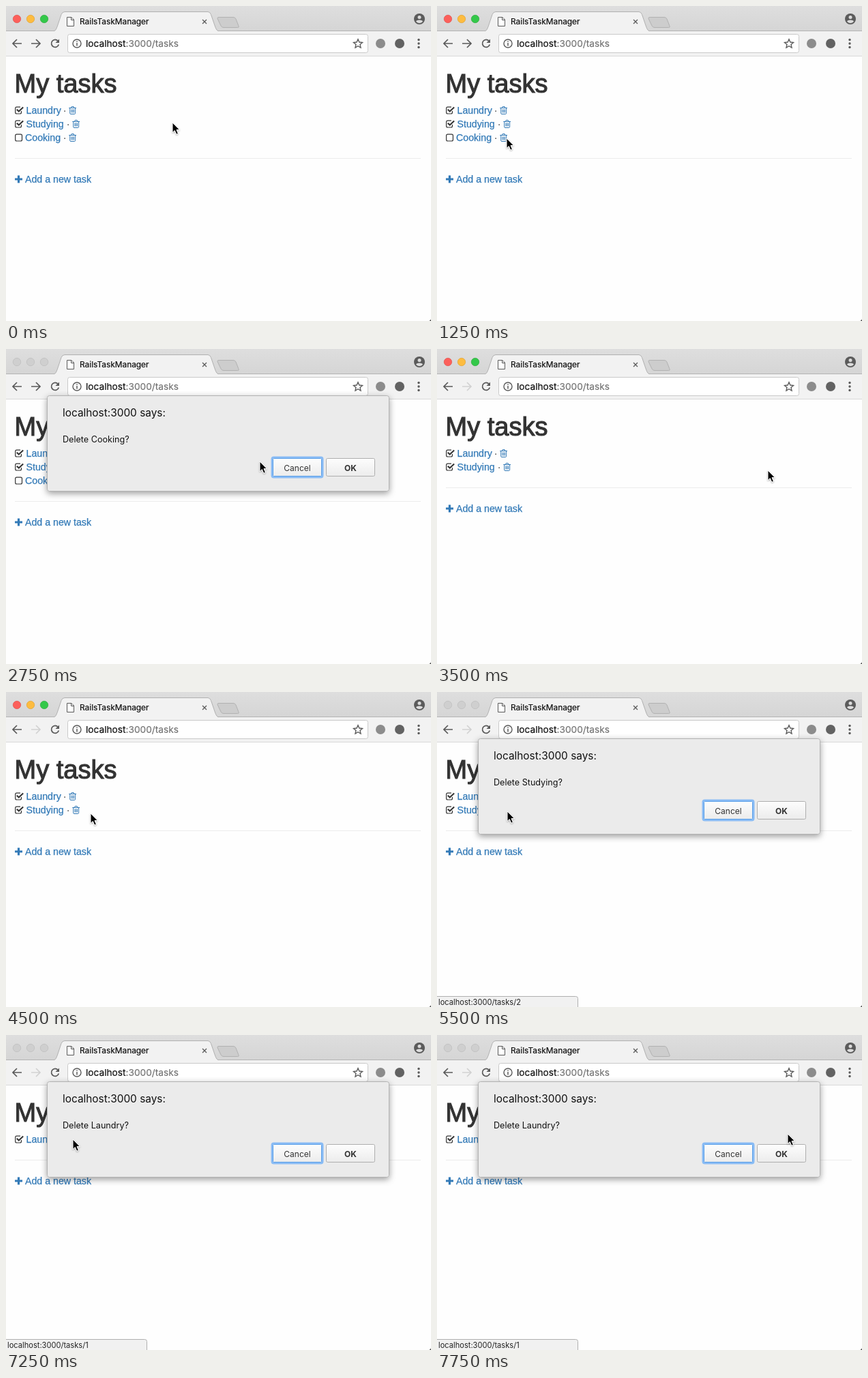
Animation, 623 px wide and 462 px high, one loop 8000 ms. Source, as an HTML page:

```html
<!DOCTYPE html>
<html lang="en">
<head>
<meta charset="utf-8">
<title>Task manager</title>
<style>
  html, body { margin: 0; width: 100%; height: 100%; overflow: hidden; background: #fefefe; }
  svg { display: block; width: 623px; height: 462px; }
  text { white-space: pre; }
  .ui { font-family: Inter, Roboto, sans-serif; }
  .page { font-family: "Liberation Sans", Arial, sans-serif; font-size: 14.2px; }
  .link { fill: #337ab7; stroke: #337ab7; stroke-width: .25; }
  .line { fill: none; stroke: #5a5a5a; stroke-width: 1.7; }
</style>
</head>
<body>
<svg viewBox="0 0 623 462">
  <defs>
    <linearGradient id="strip" x2="0" y2="1"><stop stop-color="#dedede"/><stop offset="1" stop-color="#d5d5d5"/></linearGradient>
    <linearGradient id="button" x2="0" y2="1"><stop stop-color="#fdfdfd"/><stop offset="1" stop-color="#ececec"/></linearGradient>
    <filter id="shadow" x="-10%" y="-20%" width="120%" height="150%">
      <feDropShadow dx="0" dy="3" stdDeviation="5" flood-color="#000" flood-opacity=".38"/>
    </filter>
    <filter id="soft" x="-50%" y="-30%" width="200%" height="180%">
      <feDropShadow dx="0" dy="1" stdDeviation="1" flood-color="#000" flood-opacity=".35"/>
    </filter>
  </defs>

  <rect width="623" height="462" fill="#fefefe"/>

  <g class="page">
    <text x="12.5" y="127" font-size="38" fill="#333" stroke="#333" stroke-width="1.1">My tasks</text>
    <g id="list"></g>
    <g id="footer">
      <path d="M13 163.5H608" stroke="#ececec"/>
      <path d="M13 194H24M18.5 188.5V199.5" stroke="#337ab7" stroke-width="3.2"/>
      <text class="link" x="28" y="199">Add a new task</text>
    </g>
  </g>

  <!-- browser window -->
  <rect width="623" height="37" fill="url(#strip)"/>
  <path d="M0 36.5H623" stroke="#b4b4b4"/>
  <path d="M312 16.5H333Q336 16.5 337 19L341 29.5Q342 31.5 339.5 31.5H319Q316 31.5 315 29L310 18.5Q309.5 16.5 312 16.5Z" fill="#cdcdcd" stroke="#b2b2b2"/>
  <path d="M69 37.5C73 36.5 74 33 75.5 29L81 12.5Q82.5 8.5 86 8.5H296Q299 8.5 300.5 12.5L306.5 30C308 34 309 36.5 313 37.5Z" fill="#f2f2f2" stroke="#b0b0b0"/>
  <rect y="37" width="623" height="36" fill="#f2f2f2"/>
  <path d="M0 73.5H623" stroke="#d9d9d9"/>
  <g id="lights"></g>

  <path d="M89.5 16.5H96L99.5 20V29.5H89.5ZM95.5 16.5V20.5H99.5" fill="#fff" stroke="#5a5a5a"/>
  <text class="ui" x="108" y="27.3" font-size="11.9" fill="#111" stroke="#111" stroke-width=".2">RailsTaskManager</text>
  <path d="M288 20L294 26M294 20L288 26" stroke="#5a5a5a" stroke-width="1.3"/>

  <circle cx="606" cy="19" r="8" fill="#5b5b5b"/>
  <circle cx="606" cy="16.4" r="2.5" fill="#dcdcdc"/>
  <path d="M601 22.8C602 19.7 610 19.7 611 22.8Q609 25.2 606 25.2T601 22.8Z" fill="#dcdcdc"/>

  <path class="line" d="M23 55H10M16 49L10 55L16 61"/>
  <path class="line" id="forward" d="M37 55H50M44 49L50 55L44 61"/>
  <path class="line" d="M76.2 51.3A5.5 5.5 0 1 0 77.3 56.5"/>
  <path d="M78 48.5V54H72.5Z" fill="#5a5a5a"/>

  <rect x="90.5" y="41.5" width="440" height="27" rx="3" fill="#fff" stroke="#c9c9c9"/>
  <circle class="line" cx="104" cy="55" r="6" style="stroke-width:1.4"/>
  <path d="M104 54V58.5M104 51.3V52.8" stroke="#5a5a5a" stroke-width="1.5"/>
  <text class="ui" x="117" y="60.2" font-size="13.7" fill="#111" stroke="#111" stroke-width=".2">localhost<tspan fill="#757575" stroke="#757575">:3000/tasks</tspan></text>
  <path class="line" style="stroke-width:1.4" d="M516 48.8L517.9 53L522.5 53.5L519 56.5L520 61L516 58.7L512 61L513 56.5L509.5 53.5L514.1 53Z"/>
  <circle cx="549" cy="55" r="7" fill="#8c8c8c"/>
  <circle cx="577" cy="55" r="7" fill="#626262"/>
  <g fill="#5a5a5a"><circle cx="605" cy="49.5" r="1.7"/><circle cx="605" cy="55" r="1.7"/><circle cx="605" cy="60.5" r="1.7"/></g>

  <g id="status" class="ui">
    <path d="M-1 446.5H203.5Q206.5 446.5 206.5 449.5V463H-1Z" fill="#f1f1f1" stroke="#b0b0b0"/>
    <text id="address" x="2" y="458.8" font-size="11.1" fill="#222"></text>
  </g>
  <path d="M623 459.5V462H620.5Z" fill="#555"/>

  <g id="dialog" class="ui" fill="#111">
    <rect id="panel" x="60.5" y="68.5" width="501" height="140" rx="3" fill="#ebebeb" stroke="#b3b3b3" filter="url(#shadow)"/>
    <text x="83" y="99" font-size="15.4">localhost:3000 says:</text>
    <text id="question" x="83" y="136.8" font-size="12.6"></text>
    <rect x="390" y="159" width="74" height="29" rx="2.5" fill="none" stroke="#8abcf5" stroke-width="3"/>
    <rect x="391.5" y="160.5" width="71" height="26" rx="1" fill="url(#button)" stroke="#5a9fe8"/>
    <rect id="ok" x="469.5" y="160.5" width="71" height="26" rx="2" fill="url(#button)" stroke="#aeaeae"/>
    <g font-size="12" text-anchor="middle" fill="#333">
      <text x="427" y="178.5">Cancel</text>
      <text x="505" y="178.5" font-weight="700">OK</text>
    </g>
  </g>

  <path id="cursor" d="M0 0V14.6L3.3 11.6L5.8 17.3L8.4 16.2L6 10.6H10.4Z" fill="#000" stroke="#fff" stroke-width="1" filter="url(#soft)"/>
</svg>

<script>
const LOOP = 8000;
const $ = id => document.getElementById(id);
const tasks = [
  { name: 'Laundry', done: true, trash: 92 },
  { name: 'Studying', done: true, trash: 97 },
  { name: 'Cooking', done: false, trash: 92 }
];

// [time, cursor x, cursor y, tasks left, mode]
// modes: '' idle, h hovering a bin, s status shown, d dialog, b dialog and status, c dialog closing
const steps = [
  [0, 244, 171, 3, ''],
  [750, 204, 180, 3, ''],
  [1000, 122, 194, 3, ''],
  [1250, 102, 194, 3, ''],
  [1500, 98, 191, 3, 'h'],
  [1750, 98, 191, 3, 's'],
  [2000, 98, 191, 3, 'b'],
  [2250, 99, 190, 3, 'b'],
  [2500, 205, 175, 3, 'd'],
  [2750, 372, 165, 3, 'd'],
  [3000, 496, 174, 3, 'd'],
  [3250, 502, 177, 3, 'c'],
  [3500, 485, 178, 2, ''],
  [3750, 290, 180, 2, ''],
  [4000, 136, 180, 2, ''],
  [4500, 124, 178, 2, ''],
  [4750, 103, 175, 2, 'h'],
  [5000, 103, 175, 2, 's'],
  [5250, 103, 175, 2, 'b'],
  [5750, 250, 178, 2, 'b'],
  [6000, 500, 180, 2, 'd'],
  [6250, 502, 180, 2, 'c'],
  [6500, 440, 176, 1, ''],
  [6750, 200, 161, 1, ''],
  [7000, 98, 153, 1, 's'],
  [7250, 98, 153, 1, 'b'],
  [7500, 300, 152, 1, 'b'],
  [7750, 514, 145, 1, 'b']
];

function taskRow({ name, done, trash }, row, active) {
  const box = done
    ? 'M22.5 154V156Q22.5 158 20.5 158H15.7Q13.7 158 13.7 156V150.2Q13.7 148.2 15.7 148.2H21'
    : 'M15.7 148.2H21.5Q23.5 148.2 23.5 150.2V156Q23.5 158 21.5 158H15.7Q13.7 158 13.7 156V150.2Q13.7 148.2 15.7 148.2Z';
  const tick = done ? '<path d="M15.8 151.8L18.8 154.6L25.2 148.6" fill="none" stroke="#333" stroke-width="2"/>' : '';
  return `<g transform="translate(0 ${row * 20})">
    <path d="${box}" fill="none" stroke="#333" stroke-width="1.2"/>${tick}
    <text class="link" x="${done ? 29.5 : 28}" y="158">${name}</text>
    <text x="${trash - 6}" y="158" text-anchor="middle" fill="#333">·</text>
    <path transform="translate(${trash})" fill="none" stroke="${active ? '#23527c' : '#337ab7'}"
      d="M.3 149.5H11M3.5 149.5L4.2 147.5H7.2L7.8 149.5M1.7 149.5V157.3Q1.7 158.5 3 158.5H8.3Q9.6 158.5 9.6 157.3V149.5M3.9 151.5V156.5M5.7 151.5V156.5M7.5 151.5V156.5"/>
  </g>`;
}

function drawLights(focused) {
  const fills = focused ? ['#fc605b', '#fdbc40', '#34c84a'] : Array(3).fill('#cfcfcf');
  const edges = focused ? ['#e2504b', '#e0a333', '#2bac3c'] : Array(3).fill('#bcbcbc');
  $('lights').innerHTML = fills.map((fill, i) =>
    `<circle cx="${16 + 20 * i}" cy="19" r="5.7" fill="${fill}" stroke="${edges[i]}" stroke-width=".7"/>`).join('');
}

function show([, x, y, left, mode]) {
  const closing = mode === 'c';
  const open = mode !== '' && 'dbc'.includes(mode);
  $('cursor').setAttribute('transform', `translate(${x} ${y})`);
  $('list').innerHTML = tasks.slice(0, left)
    .map((task, i) => taskRow(task, i, mode && i === left - 1)).join('');
  $('footer').setAttribute('transform', `translate(0 ${left * 20})`);
  $('forward').style.stroke = left === 3 ? '#5a5a5a' : '#d2d2d2';
  drawLights(!open);
  $('status').style.display = mode === 's' || mode === 'b' ? '' : 'none';
  $('address').textContent = `localhost:3000/tasks/${left}`;
  $('dialog').style.display = open ? '' : 'none';
  $('dialog').style.opacity = closing ? .07 : 1;
  $('dialog').setAttribute('transform', closing ? 'translate(18.9 -20.5) scale(.953 1)' : '');
  $('panel').style.display = $('ok').style.display = closing ? 'none' : '';
  $('question').textContent = `Delete ${tasks[left - 1].name}?`;
}

let current;
const start = performance.now();
function tick() {
  const time = (performance.now() - start) % LOOP;
  const step = steps.findLast(s => s[0] <= time);
  if (step !== current) show(current = step);
  requestAnimationFrame(tick);
}
tick();
</script>
</body>
</html>
```
